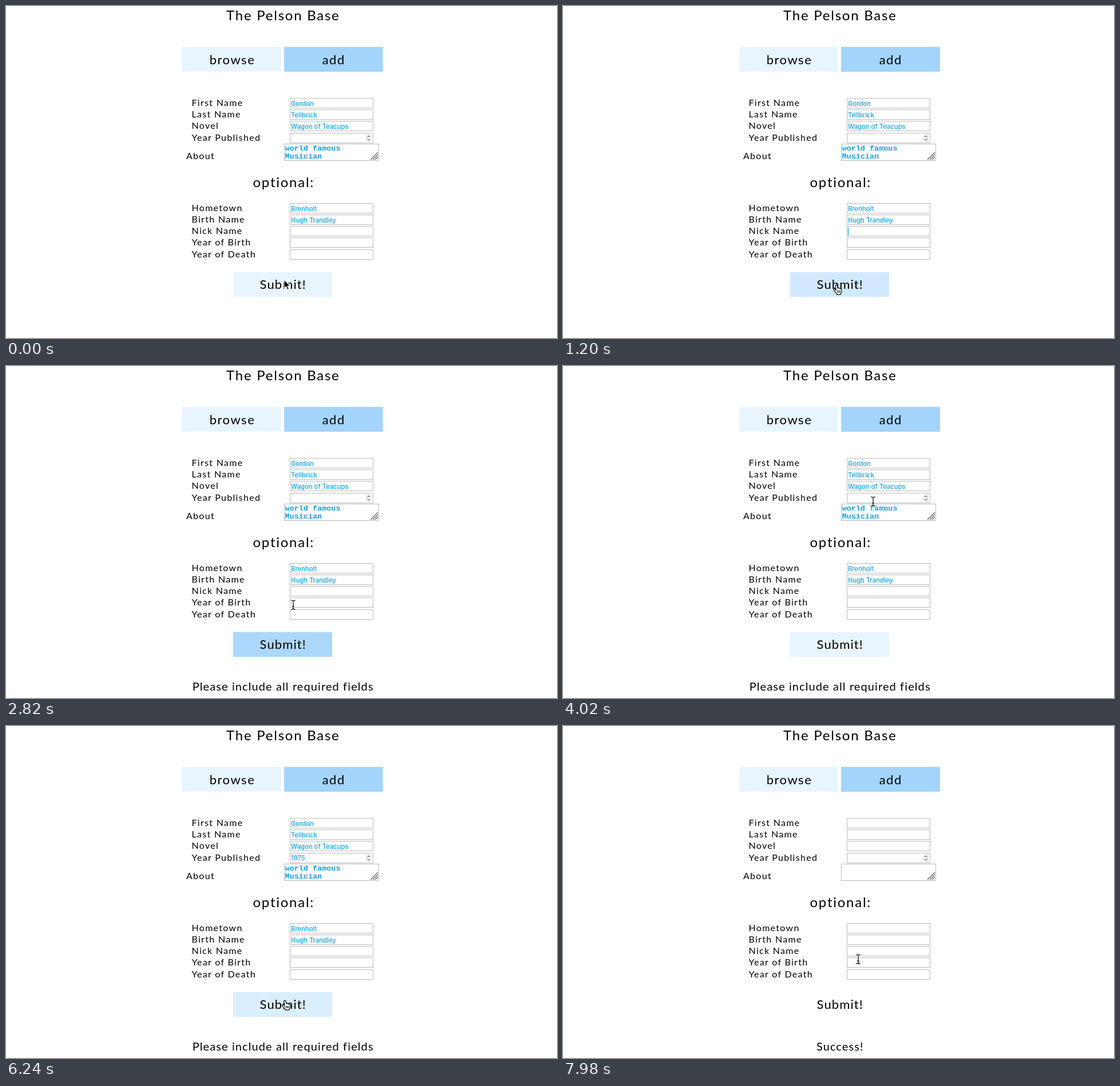
Recreate the animation shown at these times as an HTML page. Size 963 by 581 pixels, loop 8 s.

```html
<!DOCTYPE html>
<html lang="en">
<head>
<meta charset="utf-8">
<title>Add a character</title>
<style>
  html, body { margin: 0; width: 100%; height: 100%; overflow: hidden; background: #fff; }
  svg { display: block; }
  text { font-family: Lato, "Open Sans", sans-serif; fill: #000; white-space: pre; }
  .title { font-size: 24px; letter-spacing: 1.75px; }
  .button { font-size: 22px; letter-spacing: 1.5px; }
  .submit { font-size: 22px; letter-spacing: 1.1px; }
  .label { font-size: 16px; letter-spacing: 1.3px; }
  .note { font-size: 20px; letter-spacing: 1.1px; }
  .mid { text-anchor: middle; }
  .value { font: 500 11.25px Inter, "Liberation Sans", sans-serif; fill: #0fa3ea; }
  .about { font: bold 13.47px "Liberation Mono", "Courier New", monospace; fill: #0fa3ea; }
  .box { fill: #fff; stroke: #b9b9b9; stroke-width: 1; }
  .grip { fill: none; stroke: #555; stroke-width: 1.1; }
  .spin { fill: none; stroke: #555; stroke-width: 1.1; }
</style>
</head>
<body>
<svg id="stage" width="963" height="581" viewBox="0 0 963 581"></svg>
<script>
const LOOP = 8000, TICK = 60;
const LIGHT = [232, 245, 255], BLUE = [164, 212, 251];
const stage = document.getElementById('stage');

function add(tag, attrs, parent = stage) {
  const el = document.createElementNS('http://www.w3.org/2000/svg', tag);
  for (const key in attrs) el.setAttribute(key, attrs[key]);
  parent.append(el);
  return el;
}
function write(cls, x, y, string, parent) {
  const el = add('text', { class: cls, x, y }, parent);
  el.textContent = string;
  return el;
}
const rgb = c => `rgb(${c.map(Math.round)})`;
const show = (el, on) => el.setAttribute('visibility', on ? 'visible' : 'hidden');

// Static page
const button = (x, y, color) =>
  add('rect', { x, y, width: 173, height: 43.5, fill: rgb(color) });
write('title mid', 484.3, 24.5, 'The Pelson Base');
button(308, 71.5, LIGHT);
button(486, 71.5, BLUE);
write('button mid', 395.5, 102, 'browse');
write('button mid', 572.7, 102, 'add');
write('title mid', 485.3, 316.5, 'optional:');

const fields = [];
const filled = add('g', {});
function column(top, rows) {
  rows.forEach(([label, value], i) => {
    const y = top + i * 20.2;
    const snap = Math.round(y) - 0.5;
    add('rect', { class: 'box', x: 496.5, y: snap, width: 145, height: 17 });
    fields.push([496, snap, 642, snap + 17.5]);
    write('label', 324.5, y + 13, label);
    if (value) write('value', 498, y + 12.9, value, filled);
  });
}
column(162, [
  ['First Name', 'Gordon'],
  ['Last Name', 'Tellbrick'],
  ['Novel', 'Wagon of Teacups'],
  ['Year Published']
]);
column(345.8, [
  ['Hometown', 'Brenholt'],
  ['Birth Name', 'Hugh Trandley'],
  ['Nick Name'],
  ['Year of Birth'],
  ['Year of Death']
]);

write('label', 315, 268, 'About');
add('rect', { class: 'box', x: 486.5, y: 241.5, width: 165, height: 29 });
fields.push([486, 241, 652, 271]);
write('about', 487.5, 252.8, 'world famous', filled);
write('about', 487.5, 266.8, 'Musician', filled);
add('path', { class: 'grip', d: 'M637 269L650 256M641 269L650 260M645 269L650 264' });
add('rect', { x: 630.5, y: 224.5, width: 7, height: 13, rx: 3, fill: '#fff', stroke: '#c8c8c8' });
add('path', { class: 'spin', d: 'M632 229.3L634 227L636 229.3M632 232.7L634 235L636 232.7' });
stage.append(filled);

const year = write('value', 498, 235.4, '');
const submit = button(397, 465.5, LIGHT);
write('submit mid', 484.2, 495.3, 'Submit!');
const note = write('note mid', 484.2, 568, '');
const caret = add('rect', { width: 1.2, height: 14, fill: '#0fa3ea' });

// Pointers, hot spot at 0,0
const line = { 'stroke-linejoin': 'round', 'stroke-linecap': 'round' };
const pointers = { arrow: add('g', {}), hand: add('g', {}), beam: add('g', {}) };
add('path', { ...line, d: 'M0 0V15.2L3.5 12L6 17.8L8.5 16.7L6 11.1H10.8Z',
  fill: '#000', stroke: '#fff', 'stroke-width': 1.1 }, pointers.arrow);
add('path', { ...line, fill: '#fff', stroke: '#000', 'stroke-width': 1.2,
  d: 'M-1.7 1.7C-1.8 -.3 1 -.4 1.4 1.5L2.2 6C2.5 4.8 4.4 4.8 4.7 6.2' +
     'C5.2 5.4 6.8 5.7 7 7C7.7 6.4 9 6.9 9 8.3V11C9 13 7.8 14.4 7.5 16.8' +
     'H.6C0 14.4 -3.6 11.4 -5 8.9C-5.4 7.1 -3.4 6.8 -2.3 8L-.8 9.5Z' }, pointers.hand);
add('path', { ...line, fill: 'none', stroke: '#000', d: 'M1.8 10V13.6M4 10V13.6M6.2 10V13.6' },
  pointers.hand);
const beam = 'M-3.6 -8C-1.5 -8 0 -7.5 0 -6V6C0 7.5 -1.5 8 -3.6 8' +
  'M3.6 -8C1.5 -8 0 -7.5 0 -6M0 6C0 7.5 1.5 8 3.6 8M-1.8 3H1.8';
for (const [stroke, width] of [['#fff', 2.8], ['#000', 1.2]])
  add('path', { ...line, d: beam, fill: 'none', stroke, 'stroke-width': width }, pointers.beam);

// Timetables
const PATH = [
  [0, 486, 479], [360, 486, 479], [480, 452, 441], [540, 445, 435], [720, 478, 488],
  [2520, 478, 488], [2700, 488, 462], [3060, 530, 330], [3360, 552, 238],
  [3960, 552, 238], [4020, 542, 237], [5460, 542, 237], [5820, 551, 341],
  [6000, 520, 440], [6120, 495, 478], [6360, 480, 482], [7740, 480, 482],
  [7800, 492, 462], [7860, 504, 436], [7980, 516, 408], [LOOP, 516, 408]
];
const YEAR = [[0, ''], [4200, '1'], [4560, '19'], [4980, '197'], [5280, '1975'], [7140, '']];
const NOTE = [[0, ''], [1860, 'Please include all required fields'], [7140, 'Success!']];
const CARET = [[0, ''], [960, 'nick'], [1500, ''], [3540, 'year'], [4020, ''],
  [4200, 'year'], [5760, ''], [6300, 'year'], [6660, '']];
const FADES = [[960, 1], [2700, 0], [6060, 1]];
const FADE_TIME = 600;

const at = (table, t) => table.filter(row => row[0] <= t).pop();

function position(t) {
  const i = PATH.findIndex(key => key[0] > t);
  const [t0, x0, y0] = PATH[i - 1], [t1, x1, y1] = PATH[i];
  const k = (t - t0) / (t1 - t0);
  return [x0 + (x1 - x0) * k, y0 + (y1 - y0) * k];
}
function hover(t) {
  const fade = at(FADES, t);
  if (!fade) return 0;
  const k = Math.min(1, (t - fade[0]) / FADE_TIME);
  const eased = k * k * (3 - 2 * k);
  return fade[1] ? eased : 1 - eased;
}
const inside = (x, y, [l, t, r, b]) => x >= l && x <= r && y >= t && y <= b;

function pointerKind(x, y, t) {
  if (t >= 4200 && t < 5520) return '';
  if (t >= 420 && inside(x, y, [397, 466, 570, 509])) return 'hand';
  return fields.some(box => inside(x, y, box)) ? 'beam' : 'arrow';
}

function render(now) {
  const t = Math.floor((now % LOOP) / TICK) * TICK;
  const mix = hover(t);
  submit.setAttribute('fill', t >= 7800 ? '#fff' : rgb(LIGHT.map((c, i) => c + (BLUE[i] - c) * mix)));
  show(filled, t < 7140);
  year.textContent = at(YEAR, t)[1];
  note.textContent = at(NOTE, t)[1];

  const focus = at(CARET, t)[1];
  show(caret, focus);
  caret.setAttribute('x', focus === 'year' ? 498 + year.getComputedTextLength() : 498);
  caret.setAttribute('y', focus === 'year' ? 224 : 387.5);

  const [x, y] = position(t);
  const kind = pointerKind(x, y, t);
  for (const name in pointers) {
    show(pointers[name], name === kind);
    pointers[name].setAttribute('transform', `translate(${x} ${y})`);
  }
}

const start = performance.now();
function frame() {
  render(performance.now() - start);
  requestAnimationFrame(frame);
}
frame();
</script>
</body>
</html>
```
